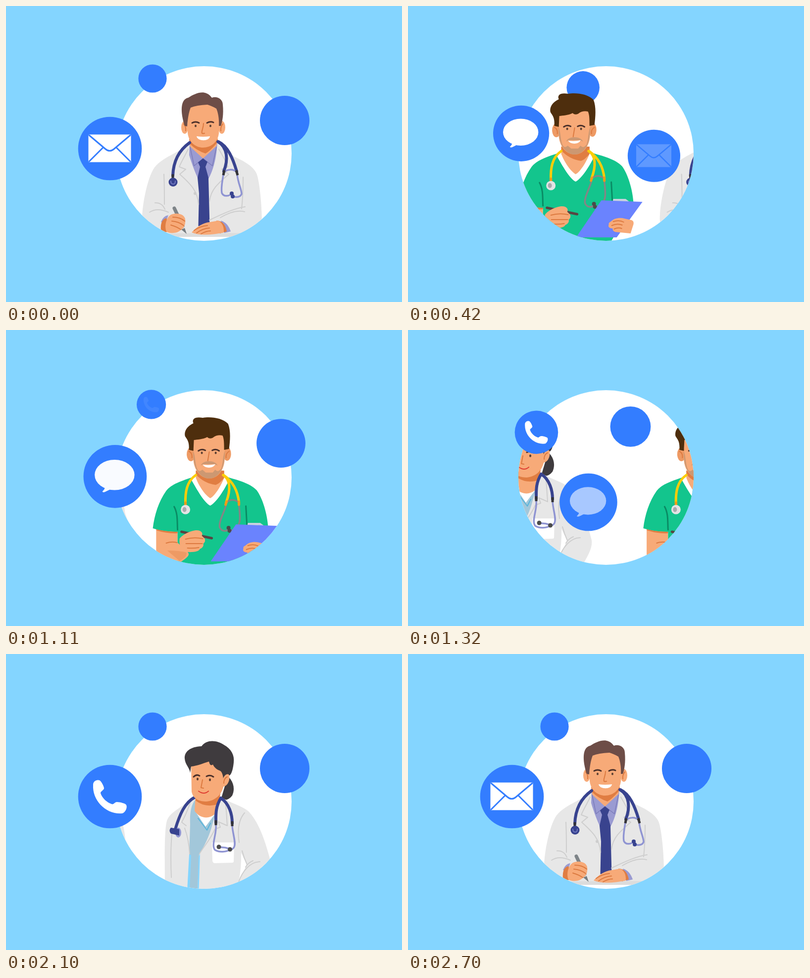
These frames come from a looping animation (800x600 px, 3150 ms). An HTML page:

```html
<!DOCTYPE html>
<html lang="en">
<head>
<meta charset="utf-8">
<title>Doctors on call</title>
<style>
@property --n { syntax: "<number>"; inherits: true; initial-value: 0; }
@property --m { syntax: "<number>"; inherits: true; initial-value: 0; }
html, body { margin: 0; width: 100%; height: 100%; overflow: hidden; background: #84d5ff; }
svg { display: block; width: 800px; height: 600px; }

/* One turn of the bubbles: 35 ticks of 30 ms, the first 20 in motion */
.turn {
  animation: tick 1050ms steps(35) -4ms infinite, arc 3150ms step-end -4ms infinite;
  --u: min(1, var(--n) / 20);
  --p: calc(var(--u) * var(--u) * (3 - 2 * var(--u)));
  --q: calc(1 - var(--p));
  --bow: calc(3 * var(--p) * var(--q));
}
@keyframes tick { from { --n: 0; } to { --n: 35; } }
@keyframes arc {
  0% { --bx: 20; --by: 117; }
  33.333% { --bx: 6; --by: 115; }
  66.667%, 100% { --bx: 7; --by: 131; }
}
.bubble { transform: translate(calc(var(--x) * 1px), calc(var(--y) * 1px)) scale(var(--s)); }
.leave {
  --x: calc(210 + 353 * var(--p) + var(--bx) * var(--bow));
  --y: calc(289 - 57 * var(--p) + var(--by) * var(--bow));
  --s: calc(1 - .222 * var(--p));
}
.enter {
  --x: calc(296 - 86 * var(--p));
  --y: calc(147 + 142 * var(--p));
  --s: calc(.445 + .555 * var(--p));
}
.pass {
  --x: calc(563 - 267 * var(--p));
  --y: calc(232 - 85 * var(--p));
  --s: calc(.778 - .333 * var(--p));
}

/* Each doctor and icon: leaves in its first turn, is away, then returns */
.k0, .k1, .k2 {
  animation: cycle 3150ms steps(105) var(--d) infinite;
  --a: clamp(0, var(--m) / 20, 1);
  --b: clamp(0, (var(--m) - 70) / 20, 1);
  --away: clamp(0, var(--m) - 34, 1);
  --out: calc(var(--a) * var(--a) * (3 - 2 * var(--a)));
  --in: calc(var(--b) * var(--b) * (3 - 2 * var(--b)));
}
@keyframes cycle { from { --m: 0; } to { --m: 105; } }
.k0 { --d: -4ms; --to: 298; --from: 272; }
.k1 { --d: -2104ms; --to: 450; --from: 284; }
.k2 { --d: -1054ms; --to: 301; --from: 287; }
.person {
  transform: translateX(calc(1px * (var(--to) * var(--out) * (1 - var(--away))
    - var(--from) * var(--away) * (1 - var(--in)))));
}
.leave use { opacity: calc(1 - var(--out)); }
.enter use { opacity: min(1, 2.45 * var(--in)); }

.blue { fill: #337dff; }
.coat { fill: #e7e7e7; }
.skin { fill: #f7aa78; }
.shade { fill: #e07d42; }
.line { fill: none; stroke-linecap: round; stroke-linejoin: round; stroke-width: 2; }
.fold { stroke: #cecece; }
.crease { stroke: #dc7a40; }
.brow { stroke: #4b302a; stroke-width: 3; }
.eye { fill: #5c4033; }
.navy { stroke: #38438f; stroke-width: 6; }
.lilac { stroke: #8f94d2; stroke-width: 3.5; }
.plug { stroke: #343438; stroke-width: 5; stroke-linecap: butt; }
</style>
</head>
<body>
<svg viewBox="0 0 800 600">
  <defs>
    <clipPath id="lens"><circle cx="400" cy="299" r="177"/></clipPath>
    <g id="mail">
      <rect x="-43.5" y="-28.5" width="86" height="56" rx="1.5" fill="#fff"/>
      <path class="line" stroke="#337dff" style="stroke-width:3" d="M-42 -27L-9 1Q-.5 8 8 1L41 -27M-42 26L-14 -2M41 26L13 -2"/>
    </g>
    <g id="chat" fill="#fff">
      <ellipse cx="-1" cy="-3" rx="40.5" ry="31"/>
      <path d="M-21 20C-20 25 -23 28 -26 31Q-24 34 -17 30L-7 25Z"/>
    </g>
    <path id="call" fill="#fff" d="M-34 -24C-34 -31 -27 -35 -21 -33C-17 -31 -12 -20 -12 -17C-12 -13 -19 -11 -19 -7C-16 3 -6 12 3 15C8 17 9 11 14 11C20 11 32 14 33 17C36 23 30 33 25 34C-8 37 -36 8 -34 -24Z"/>
  </defs>

  <rect width="800" height="600" fill="#84d5ff"/>
  <circle cx="400" cy="299" r="177" fill="#fff"/>

  <g class="turn"><circle class="bubble pass blue" r="64.3"/></g>

  <g clip-path="url(#lens)">
    <!-- doctor with a tie -->
    <g class="person k0">
      <path fill="#dcdcdc" d="M300 457H497V465Q497 468 494 468H303Q300 468 300 465Z"/>
      <path class="coat" d="M372 277C352 298 312 306 297 332C284 356 275 405 275 432C276 450 288 459 305 461L490 460C512 459 517 452 517 440C517 400 512 360 508 345C503 322 470 310 450 300C440 292 430 283 428 274Z"/>
      <path fill="#9a9bd2" d="M371 276L370 302C376 322 383 340 389 352H408C416 338 425 315 427 276Z"/>
      <path class="skin" d="M370 268H428L425 284L398 309L372 285Z"/>
      <path class="shade" d="M370 270H428L425 279Q412 294 403 299Q385 293 372 280Z"/>
      <path class="line" stroke="#7b7cba" style="stroke-width:1.5" d="M372 286L380 324L398 309L417 324L425 286"/>
      <path fill="#39438e" d="M398 309L407 316L403 326L409 348L411.500 446H388.500L390 380L387 348L392 326L388 317Z"/>
      <path class="line fold" d="M368 290C362 303 354 316 350 326L363 331L351 341C372 360 387 374 389 402M430 290C437 303 446 316 448 326L436 331L450 341C428 360 414 372 411 396M319 341C320 360 320 385 320 402M479 347C479 370 479 385 476 411M301 399Q315 398 321 412M290 418Q305 408 328 418M411 434C440 420 462 410 483 407M433 429Q462 412 482 417"/>
      <circle cx="382" cy="380" r="3" fill="#cecece"/>
      <path class="line navy" d="M371 277C350 292 338 315 337 344M428 275C448 287 449 312 440 335M429 275C448 284 458 308 466 335"/>
      <path class="line lilac" d="M440 338C446 330 460 330 466 337M439 342C437 356 434 368 436 379C440 388 452 385 456 380M467 342C469 360 476 372 476 381C473 388 465 388 458 386"/>
      <path class="line plug" d="M337 341V350M441 333L439 343M465 333L468 343"/>
      <circle cx="337.500" cy="357" r="9" fill="#38438f"/>
      <path class="line" stroke="#7078c0" d="M333 355Q333 361 338 361Q342 361 342 355"/>
      <circle cx="456" cy="380" r="4" fill="#38438f"/><circle cx="458" cy="386" r="4" fill="#38438f"/>

      <g class="skin"><ellipse cx="361" cy="246" rx="7" ry="13"/><ellipse cx="436" cy="246" rx="7" ry="13"/></g>
      <path class="line crease" d="M359 239Q364 244 363 253M438 239Q433 245 434 253"/>
      <path class="skin" d="M366 207L367 257C369 277 384 287 398 287C414 287 428 276 430 258L432 210C420 193 380 193 366 207Z"/>
      <path fill="#6d4d47" d="M366 244L361 243C352 215 352 189 368 186C380 178 395 172 405 177C411 179 414 184 416 186C425 182 438 188 438 200C440 220 437 235 434 243H430C431 228 428 215 425 208C418 204 413 202 407 200Q385 201 373 206C369 216 367 230 366 244Z"/>
      <path class="line brow" d="M376 237Q383 233 390 237M406 237Q413 233 419 236"/>
      <g class="eye"><ellipse cx="383" cy="243" rx="2" ry="2.600"/><ellipse cx="413" cy="243" rx="2" ry="2.600"/></g>
      <path class="line crease" d="M399 238C399 248 394 254 396 258Q398 259 401 258"/>
      <path fill="#fff" d="M385 264Q398 266 412 264C411 275 387 275 385 264Z"/>

      <path fill="#9a9bd2" d="M313 438Q318 425 328 424L322 440Z"/>
      <path class="shade" d="M313 455Q311 433 324 430L332 457L318 459Z"/>
      <path class="line" stroke="#7e8488" style="stroke-width:7" d="M340 410L357 446"/>
      <path class="skin" d="M324 457C319 444 325 425 336 422C350 418 361 424 362 432Q364 448 352 455C345 461 331 462 324 457Z"/>
      <path class="line crease" d="M337 428Q352 428 361 436M335 436Q349 437 359 445M333 444Q344 447 353 453"/>
      <path fill="#777d81" d="M354 453L361 450L365 462Z"/>
      <path fill="#9a9bd2" d="M434 435Q448 439 454 457L441 460Z"/>
      <path class="shade" d="M425 435Q442 435 446 457L432 461Z"/>
      <path class="skin" d="M375 459C385 448 398 439 412 438L429 435Q441 442 440 459C420 464 390 466 375 459Z"/>
      <path class="line crease" d="M380 455Q392 446 407 445M385 460Q397 451 411 450M394 462Q404 456 413 456"/>
    </g>

    <!-- nurse in green -->
    <g class="person k1">
      <path class="skin" d="M291 399V472H340L372 452L334 432V405Z"/>
      <path fill="#13c58d" d="M368 297C342 306 322 312 311 326C296 347 287 375 284 402C300 407 318 409 334 409V480H470L517 400C515 370 505 340 494 325C480 310 455 304 430 297Z"/>
      <path class="skin" d="M291 472V406Q312 411 333 411V430L353 449C362 456 352 462 338 472Z"/>
      <path class="shade" d="M291 404Q312 409 334 409V412Q312 413 291 406Z"/>
      <path fill="#ee9a64" d="M313 447Q338 447 352 451Q354 460 338 468Z"/>
      <path class="line crease" d="M311 432Q322 428 333 431"/>
      <path fill="#fff" d="M371 296L362 304C374 325 388 350 400 356C412 350 428 325 438 304L428 296Z"/>
      <path class="skin" d="M371 285H428V300C420 320 408 337 400 341C390 335 378 318 371 300Z"/>
      <path class="shade" d="M371 285H428V300Q418 312 411 314Q388 311 371 293Z"/>
      <path class="line" stroke="#0a8b64" style="stroke-width:3" d="M327 358C335 372 333 390 334 405M472 357L474 394"/>
      <path class="line" stroke="#fccd08" style="stroke-width:5" d="M371 294C352 307 349 330 350 353M426 294C443 305 440 328 432 350M427 294C447 308 456 328 458 350"/>
      <path class="line" stroke="#858585" style="stroke-width:3.5" d="M432 350Q445 339 458 350M432 355C428 370 417 388 419 400C424 410 434 408 437 403M458 355C460 375 462 390 455 398Q449 406 440 407"/>
      <path class="line" stroke="#f39a18" style="stroke-width:5" d="M350 350V355M433 348L431 354M458 348V354"/>
      <ellipse cx="350" cy="364" rx="9.500" ry="9.500" fill="#e3e3e5"/><ellipse cx="348" cy="364" rx="4" ry="5" fill="#a9a9ad"/>
      <circle cx="437" cy="401" r="4" fill="#4b4b4b"/><circle cx="439" cy="407" r="4" fill="#4b4b4b"/>

      <g fill="#ee9a64"><ellipse cx="361" cy="252" rx="8.500" ry="14"/><ellipse cx="434" cy="251" rx="8" ry="14"/></g>
      <path class="line crease" d="M357 246Q364 249 363 259M438 246Q431 250 432 259"/>
      <path class="skin" d="M366 212V265C368 286 382 301 398 301C414 301 427 286 429 265L430 208Z"/>
      <path fill="#cc9872" d="M366 245C364 278 378 301 398 301C418 301 431 278 429 245C425 260 426 270 422 281Q415 290 410 283L405 289H391L384 283Q377 290 373 280C369 268 370 258 366 245ZM381 275C384 263 411 263 415 275L410 272H385Z"/>
      <path fill="#4e2e0d" d="M366 245L357 243C358 225 353 222 349 215C347 205 353 195 366 189C362 180 370 175 385 178C400 175 425 178 436 190C442 205 440 225 438 241L428 243C428 230 428 221 425 214C418 212 411 214 407 217C403 221 396 220 394 217C384 222 374 222 367 223Z"/>
      <path class="line brow" d="M376 245Q383 240 390 244M404 244Q411 240 418 245"/>
      <g class="eye"><ellipse cx="383" cy="249" rx="2" ry="2.500"/><ellipse cx="411" cy="249" rx="2" ry="2.500"/></g>
      <path class="line crease" d="M398 247L395 265"/>
      <path fill="#fff" d="M385 273Q398 275 410 272C407 281 389 281 385 273Z"/>

      <path class="line" stroke="#584542" style="stroke-width:5" d="M342 409L403 422"/>
      <path class="skin" d="M338 423C345 413 363 406 373 406C382 406 386 412 383 417L389 423Q391 429 386 433Q388 440 379 444Q376 451 354 450Q336 447 338 423Z"/>
      <path class="line crease" d="M350 424Q367 419 385 423M351 433Q368 433 384 433M354 442Q366 443 377 441"/>
      <path fill="#c9d1df" d="M476 391H501L509 397L475 396Z"/>
      <path fill="#6a83fe" d="M452 394L535 397L483 469H401Z"/>
      <path class="skin" d="M471 437C477 430 490 428 499 431L513 434Q518 436 517 442L511 461L480 458Q474 456 475 451Q464 450 467 443Q466 439 471 437Z"/>
      <path class="line crease" d="M476 437Q488 433 497 438M473 445Q484 440 494 444M478 452Q486 448 493 451"/>
    </g>

    <!-- doctor with dark hair -->
    <g class="person k2">
      <path fill="#3f3b3e" d="M448 248C460 258 463 274 457 287Q448 299 434 295Z"/>
      <path class="coat" d="M380 288C360 310 332 318 325 338C319 360 321 430 321 480H470L471 462L487 430L520 472C530 455 538 440 536 426C528 395 515 345 490 319C475 306 450 302 434 289Z"/>
      <path class="coat" d="M487 425L470 465V480H516L530 430Z"/>
      <path fill="#fff" d="M475 403Q480 415 487 425L470 463Q476 430 475 403Z"/>
      <path fill="#a2c7da" d="M382 296C374 306 371 322 372 345L370 408L371 480H387L390 407C400 390 411 370 417 345L425 318Z"/>
      <path fill="#84d5ff" d="M370 406L374 408L371 480H366ZM392 404L389 412L387 480H389.500Z"/>
      <path fill="#fff" d="M381 316L387 326L403 350L421 326Z"/>
      <path class="line" stroke="#58b4da" d="M388 333L406 357L413 343"/>
      <path class="skin" d="M383 285H432L426 320C414 336 392 335 381 318Z"/>
      <path class="shade" d="M383 288L433 283L430 304Q403 313 383 297Z"/>
      <path class="line fold" d="M361 353C368 372 370 388 371 405M372 302Q364 325 355 341L364 348M444 304L447 348L429 340L433 351L422 355C412 378 398 392 391 405M336 356C332 390 333 430 334 453M482 322C468 338 468 362 471 382M477 399Q481 414 487 427M513 421C492 421 477 442 470 462M499 419Q489 423 484 432"/>
      <path fill="#fff" d="M416 382H461L460 420Q460 423 457 423L421 424Q417 423 417 418Z"/>
      <path class="line navy" d="M382 290C361 301 351 325 342 355M434 292C423 310 424 325 424 342M434 292C451 303 457 325 457 343"/>
      <path class="line lilac" d="M424 347C426 365 414 387 422 397C431 403 445 401 452 397M457 348C458 365 465 382 461 391Q458 397 453 396M430 392Q441 391 452 395"/>
      <path class="line plug" d="M424 337V347M457 339V349"/>
      <ellipse cx="348" cy="362" rx="6" ry="10" fill="#8f94d2"/>
      <path fill="#38438f" d="M333 352L350 355V368L333 364Q328 358 333 352Z"/>
      <circle cx="430" cy="391" r="4.500" fill="#4b4b4b"/><circle cx="452.500" cy="396" r="4.500" fill="#4b4b4b"/>

      <path class="skin" d="M374 223L375 279C378 295 392 299 405 299C425 297 437 283 440 265L446 235L430 210Z"/>
      <path fill="#3f3b3e" d="M372 241C371 230 362 225 361 212C360 198 372 188 395 187C405 173 425 174 440 184C455 192 462 205 460 220C459 230 457 240 453 245L439 256C439 248 437 240 433 237C425 234 420 229 418 224C412 228 411 221 410 218C397 222 385 227 374 228Z"/>
      <path class="skin" d="M437 258C439 245 449 240 451 246C453 258 446 270 436 269Z"/>
      <path class="line crease" d="M447 249Q440 252 440 262"/>
      <path class="line brow" d="M379 249Q385 243 391 247M405 248Q412 244 419 249"/>
      <g class="eye"><ellipse cx="387" cy="253.500" rx="2" ry="2.800"/><ellipse cx="412" cy="255" rx="2" ry="2.800"/></g>
      <path class="line crease" d="M397 255L394 271L399 272"/>
      <path class="line" stroke="#df3c30" d="M389 278Q400 286 409 278"/>
    </g>
  </g>

  <g class="turn">
    <g class="bubble leave">
      <circle class="blue" r="64.3"/>
      <use class="k0" href="#mail"/><use class="k1" href="#chat"/><use class="k2" href="#call"/>
    </g>
    <g class="bubble enter">
      <circle class="blue" r="64.3"/>
      <use class="k0" href="#mail"/><use class="k1" href="#chat"/><use class="k2" href="#call"/>
    </g>
  </g>
</svg>
</body>
</html>
```
